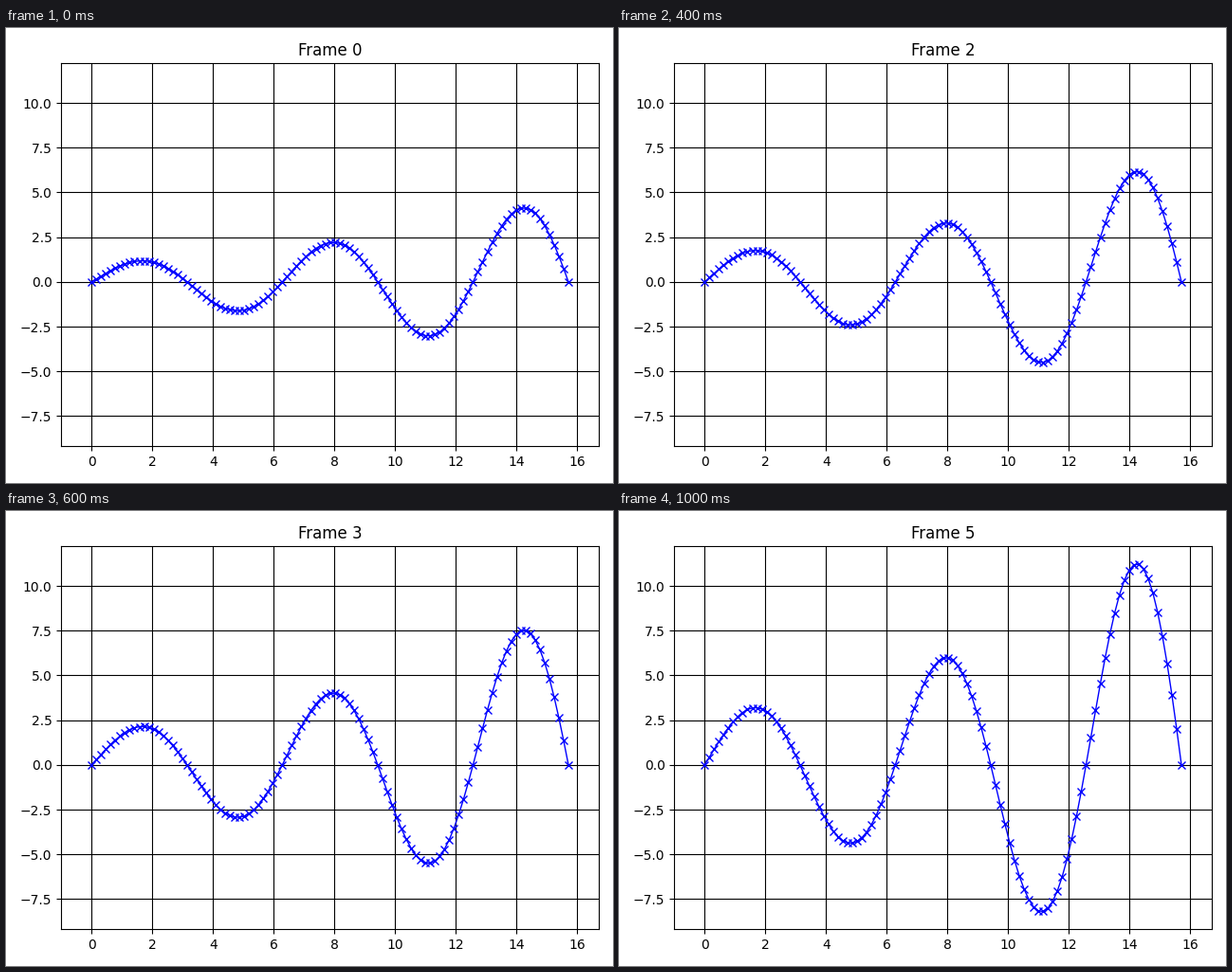
A matplotlib script that plays this animation: 640 px wide and 480 px high, repeating every 1.2 s.

```python
import matplotlib.pyplot as plt
import numpy as np
from matplotlib.animation import FuncAnimation

FRAMES = 6
INTERVAL = 200  # ms

x = np.linspace(0, 5 * np.pi, 101)


def wave(n):
    """Growing sine whose amplitude rises exponentially with each step."""
    return np.exp(0.1 * x + 0.2 * n) * np.sin(x)


fig, ax = plt.subplots(figsize=(6.4, 4.8), dpi=100)
line, = ax.plot(x, wave(0), "bx-", linewidth=1)
title = ax.set_title("Frame 0")

tallest = wave(FRAMES - 1)
ax.set_xlim(x.min() - 1, x.max() + 1)
ax.set_ylim(tallest.min() - 1, tallest.max() + 1)
ax.grid(color="black", linestyle="-", linewidth=0.8)
fig.tight_layout()


def update(n):
    line.set_ydata(wave(n))
    title.set_text(f"Frame {n}")
    return line, title


anim = FuncAnimation(fig, update, frames=FRAMES, interval=INTERVAL,
                     repeat=True, repeat_delay=0)
plt.show()
```
